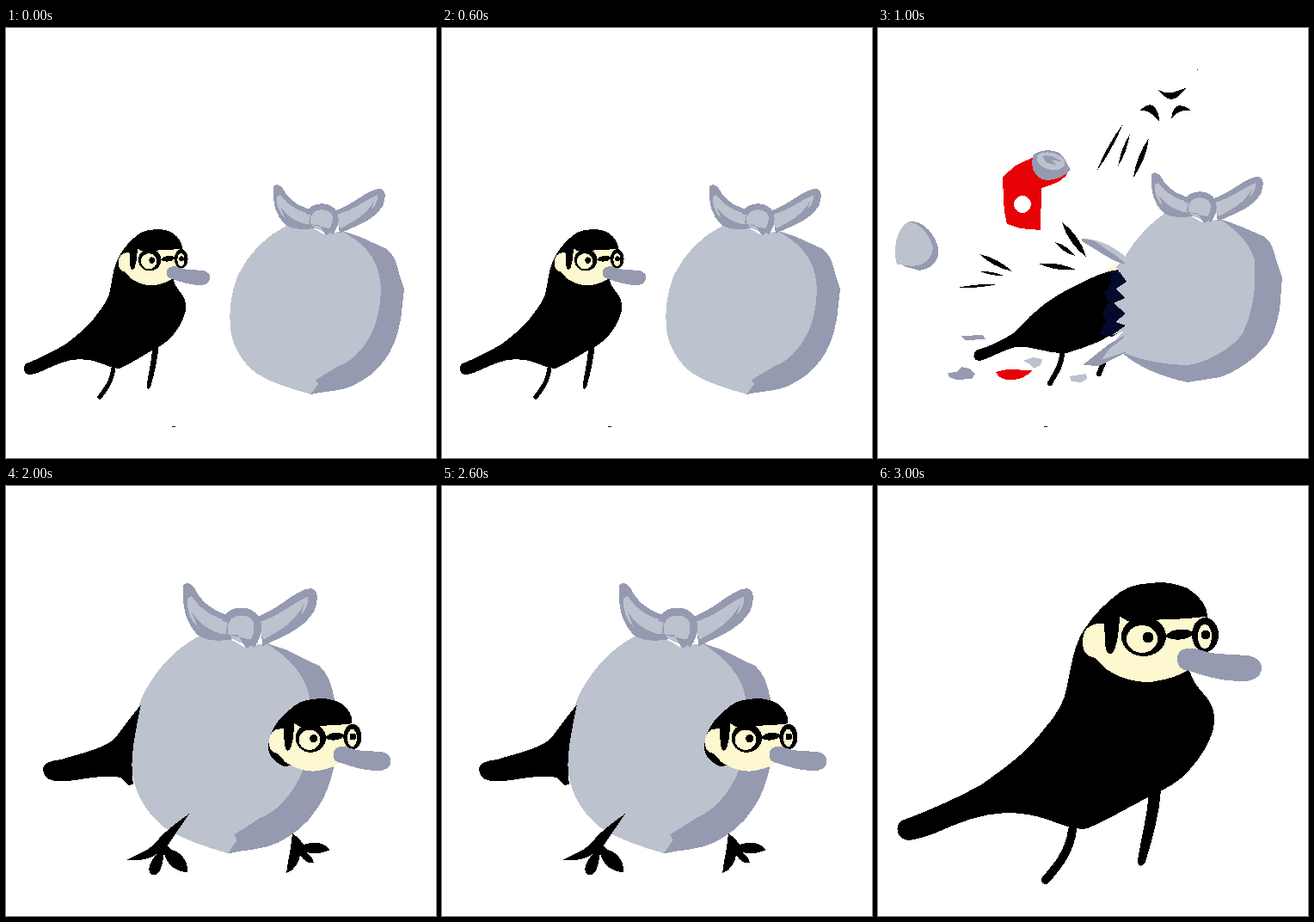
These frames come from a looping animation (500x500 px, 4000 ms). An HTML page:

```html
<!DOCTYPE html>
<html lang="en">
<head>
<meta charset="utf-8">
<title>Bird and bag</title>
<style>
  html, body { margin: 0; width: 100%; height: 100%; overflow: hidden; background: #fff; }
  svg { display: block; width: 100vw; height: 100vh; }
  .light { fill: #bcc2ce; }
  .shade { fill: #959ab0; }
  .cream { fill: #fdf8cf; }
  .red { fill: #e60205; }
  .navy { fill: #030a2c; }
  .white { fill: #fff; }
  .leg { fill: none; stroke: #000; stroke-linecap: round; }
</style>
</head>
<body>
<svg viewBox="0 0 500 500" shape-rendering="crispEdges">
  <defs>
    <g id="face">
      <path class="cream" d="M238 184C237 168 245 159 262 160L282 152L290 157C320 155 350 156 380 152C393 158 397 172 394 184L362 213C350 221 338 224 328 226C310 231 288 226 272 217C261 212 258 203 252 200C243 198 238 193 238 184Z"/>
      <path d="M262 156C265 168 262 188 267 194C271 198 275 192 276 187C279 179 280 168 281 153Z"/>
      <ellipse cx="309" cy="175" rx="26" ry="23"/>
      <ellipse class="cream" cx="307" cy="178" rx="18" ry="16"/>
      <circle cx="314" cy="176" r="6.5"/>
      <path d="M333 175C342 165 358 164 369 171C358 180 345 181 333 175Z"/>
      <ellipse cx="380.500" cy="173" rx="15.500" ry="20"/>
      <ellipse class="cream" cx="380" cy="175" rx="8" ry="14"/>
      <circle cx="381" cy="173" r="5.500"/>
      <path class="shade" d="M348 202C347 190 358 188 368 189C378 191 384 194 394 195L430 197C442 199 447 206 446 214C444 225 432 228 418 227C397 226 380 221 362 215C352 214 348 210 348 202Z"/>
    </g>

    <g id="bird">
      <path d="M28 389C55 379 90 364 119 348C153 324 172 310 192 284C208 266 217 250 219 236C225 208 228 183 241 165C252 148 266 135 282 123C294 114 312 113 330 112C345 113 352 116 360 119C374 128 384 140 383 153L362 214C367 232 378 239 385 250C391 259 392 270 390 282C385 302 370 324 352 340C340 350 326 356 314 362C290 374 268 388 244 398C234 400 224 398 214 394C195 387 178 380 148 380C120 381 92 392 68 403C55 408 44 411 36 412C22 412 18 395 28 389Z"/>
      <path class="leg" stroke-width="10" d="M226 400C223 426 207 444 195 458"/>
      <path d="M315 357L329 353C328 378 319 411 311 437C308 444 301 443 302 435C306 408 313 385 315 357Z"/>
      <use href="#face"/>
    </g>

    <g id="knot">
      <path class="shade" d="M311 184C315 180 321 183 325 192C332 203 344 208 356 212L364 232C350 235 333 235 325 229C314 219 309 203 311 184Z"/>
      <path class="light" d="M315 196L319 194C328 207 342 214 354 216L352 227L360 229C342 229 329 222 319 208L325 222C317 215 314 205 315 196Z"/>
      <path class="shade" d="M384 212C406 204 420 188 434 187C442 187 442 197 438 207C427 225 404 231 388 239Z"/>
      <path class="light" d="M385 217C406 211 417 200 432 194C433 200 430 206 425 211L428 201C419 218 404 225 389 233L384 224Z"/>
      <path class="light" d="M354 226C351 206 383 203 383 223L378 241L358 232Z"/>
      <path fill="none" stroke="#959ab0" stroke-width="7" d="M352 217C356 204 381 205 383 219C384 227 381 233 377 238"/>
      <path class="shade" d="M350 228L364 229L372 241L379 237L376 233Z"/>
    </g>

    <g id="bag">
      <path class="light" d="M326 230C302 242 283 261 270 287C261 309 259 330 261 350C264 373 276 390 292 402C309 413 333 420 355 426L400 408L445 350L450 290L425 253L392 236L370 240L350 229Z"/>
      <path class="shade" d="M391 236L410 242L443 257C450 262 455 274 457 285L463 304L459 339C455 359 449 375 441 385C430 401 417 409 403 416C388 423 371 422 354 426L363 414L360 409C368 404 376 400 385 394C408 386 423 363 430 343C438 316 440 280 420 259C413 250 402 243 391 236Z"/>
      <use href="#knot"/>
    </g>
  </defs>

  <g class="scene">
    <use href="#bag"/>
    <use href="#bird" transform="translate(21 234) scale(.511 .564) translate(-23 -112)"/>
    <path d="M193 463h4v1h-4z"/>
  </g>

  <g class="scene">
    <path d="M114 375C130 370 146 363 160 353C182 327 205 311 229 300C246 291 262 283 280 281L288 345C270 361 244 371 219 378C199 380 176 368 160 371C144 375 132 383 119 387C111 388 109 379 114 375Z"/>
    <path class="cream" d="M263 281L277 274L281 280Z"/>
    <path class="leg" stroke-width="6" d="M214 378C214 392 206 402 200 413"/>
    <path class="leg" stroke-width="6" d="M264 385L257 402"/>
    <path class="navy" d="M271 282L290 286L288 350L272 359L257 356L265 340L261 332L268 318L263 308L271 296Z"/>
    <path class="light" d="M333 216C318 226 299 245 288 265L277 278L289 295L277 303L287 314L274 320L288 332L276 342L288 346L272 357L285 353L270 370L286 378C305 392 335 402 362 408L425 375L450 330L450 260L399 222L377 226L357 215Z"/>
    <path class="shade" d="M398 222C414 227 437 237 450 243C458 249 461 262 464 273L470 290L467 328C463 350 456 367 446 375C432 389 415 400 398 406L360 412C332 406 303 395 283 377C309 388 339 392 361 392C386 388 413 371 424 355C437 330 440 295 438 270C433 249 413 233 398 222Z"/>
    <use href="#knot" transform="translate(7 -14)"/>
    <path class="light" d="M237 245C259 245 278 256 293 271L290 279C274 265 256 252 237 247Z"/>
    <path class="shade" d="M237 245L251 247C265 258 277 263 290 276C269 271 258 259 237 248Z"/>
    <path class="shade" d="M286 358L268 368L238 392L257 393L289 377Z"/>
    <path class="light" d="M286 360L268 374L260 386L292 375Z"/>

    <path class="red" d="M145 173L160 160L183 149L187 170L222 166C218 176 208 181 190 186L189 235L165 233L150 228C145 211 146 192 145 173Z"/>
    <circle class="white" cx="168" cy="205" r="10"/>
    <path class="shade" d="M180 149C185 141 207 139 215 149L224 165C215 174 202 179 191 176C181 172 177 160 180 149Z"/>
    <path class="light" d="M185 148C195 141 210 145 216 153C221 160 211 167 202 165C191 164 183 156 185 148Z"/>
    <path class="shade" d="M191 149C199 147 207 150 214 156L202 153L207 159L196 157Z"/>

    <path class="shade" d="M34 226C51 221 66 239 70 256C72 270 63 280 48 282L30 277Z"/>
    <path class="light" d="M33 227C45 222 61 240 64 256C62 273 47 279 33 276L22 275C17 257 21 236 33 227Z"/>

    <g id="slivers"></g>
    <path d="M326 72C339 79 347 73 358 70C351 79 346 83 341 83C335 82 331 78 326 72ZM305 96C311 89 317 88 321 91C325 96 327 101 327 108C320 101 314 95 305 96ZM341 105C342 96 346 90 351 90C356 91 360 92 364 96C354 95 347 98 341 105Z"/>
    <path d="M371 48h1v1h-1zM193 463h4v1h-4z"/>

    <path class="shade" d="M97 358L122 357L125 362L101 363ZM81 401L92 400L97 394L106 396L113 402L109 408L91 409L83 406Z"/>
    <path class="red" d="M137 400L150 397L179 398C173 406 163 410 150 409C143 408 139 404 137 400Z"/>
    <path class="light" d="M169 387L180 383L191 385L189 392L181 396L175 390ZM223 405L242 402L243 408L236 412L225 411Z"/>
  </g>

  <g class="scene">
    <use href="#bag" transform="translate(145 114) scale(1.2 1.29) translate(-260 -183)"/>
    <path d="M157 254C140 275 134 284 126 294C112 306 86 311 64 318C49 320 42 322 43 331C45 343 56 344 73 343C96 340 119 335 133 339L142 348L148 347C143 315 151 285 157 254Z"/>
    <path d="M213 381C199 391 182 403 172 417C162 426 150 429 140 435C157 436 167 434 175 428C169 435 164 444 167 450C171 455 177 452 179 447C183 440 182 433 184 427C186 438 196 449 211 449C212 439 206 426 192 423L188 418Z"/>
    <path d="M333 404C331 424 328 435 326 450C336 447 341 437 342 429C346 436 353 440 358 438C357 433 353 429 350 426C359 429 368 427 377 423C371 416 361 412 346 417L341 410Z"/>
    <g transform="translate(306 247) scale(.68 .73) translate(-238 -112)">
      <path d="M264 221C244 212 233 198 237 184C240 172 241 167 245 160C252 147 266 135 282 123C294 114 312 113 330 112C345 113 352 116 360 119C374 128 382 140 379 153L350 200Z"/>
      <use href="#face"/>
    </g>
  </g>

  <g class="scene"><use href="#bird"/></g>
</svg>
<script>
  const HOLD = 1000;
  const scenes = [...document.querySelectorAll('.scene')];

  // Tapered streak from one point to another, w wide in the middle.
  function sliver([x1, y1, x2, y2, w]) {
    const len = Math.hypot(x2 - x1, y2 - y1);
    const nx = (y1 - y2) / len * w, ny = (x2 - x1) / len * w;
    const mx = (x1 + x2) / 2, my = (y1 + y2) / 2;
    return `M${x1} ${y1}Q${mx + nx} ${my + ny} ${x2} ${y2}Q${mx - nx} ${my - ny} ${x1} ${y1}Z`;
  }

  const streaks = [
    [285, 111, 254, 167, 4], [293, 123, 279, 161, 4], [315, 128, 297, 174, 6],
    [214, 226, 242, 266, 8], [187, 274, 230, 281, 6], [206, 249, 229, 265, 5],
    [118, 263, 156, 283, 6], [119, 283, 146, 288, 3], [92, 302, 139, 298, 3]
  ];
  document.getElementById('slivers').innerHTML = `<path d="${streaks.map(sliver).join('')}"/>`;

  function draw(ms) {
    const now = Math.floor(ms / HOLD) % scenes.length;
    scenes.forEach((s, i) => s.setAttribute('display', i === now ? 'inline' : 'none'));
  }

  const start = performance.now();
  function tick() {
    draw(performance.now() - start);
    requestAnimationFrame(tick);
  }
  draw(0);
  requestAnimationFrame(tick);
</script>
</body>
</html>
```
